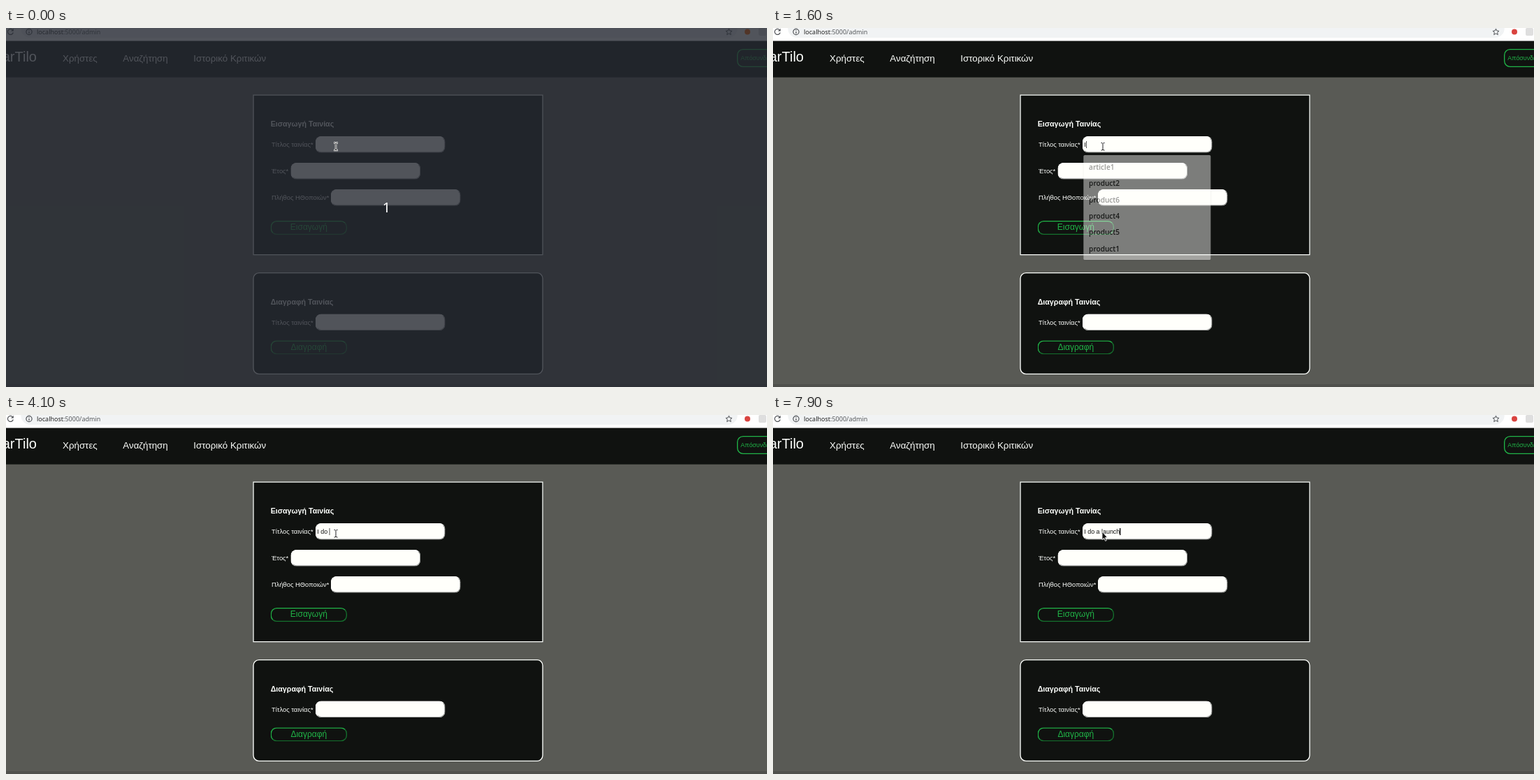
Animation, 1089 px wide and 514 px high, one loop 8000 ms. Source, as an HTML page:

```html
<!DOCTYPE html>
<html lang="el">
<head>
<meta charset="utf-8">
<title>Admin form</title>
<style>
html, body { margin: 0; width: 100%; height: 100%; overflow: hidden; }
#stage { position: relative; width: 1089px; height: 514px; overflow: hidden; background: #595a55; }
#page { position: absolute; width: 1634px; height: 771px; transform: scale(.66667); transform-origin: 0 0;
  font-family: "Liberation Sans", Arial, sans-serif; color: #fdfffc; }
#page *, #dim, #count, svg { position: absolute; box-sizing: border-box; white-space: pre; }
#bar { width: 1634px; height: 28px; background: #fff; }
#pill { left: 32px; top: -20px; width: 1538px; height: 41px; border-radius: 20px; background: #f1f3f4; }
#url { left: 66px; top: 8px; font: 13.5px/0 "Noto Sans", sans-serif; color: #55585b; }
#url b { position: static; font-weight: 400; color: #222; }
#head { top: 28px; width: 1634px; height: 78px; background: #101210; }
#foot { top: 765px; width: 1634px; height: 6px; background: #4f504c; }
.t { line-height: 0; }
.nav { top: 65px; font-size: 20px; }
#logo { right: 1568px; top: 61.5px; font-size: 30px; }
.panel { left: 530px; width: 623px; border: 2px solid #fdfffc; background: #101210; }
.title { left: 568px; font-size: 16px; font-weight: 700; }
.label { left: 570px; font-size: 14px; }
.field { width: 279px; height: 36px; border-radius: 13px; background: #fffffb;
  border: 2px solid; border-color: #fffffb #a3a5a3 #a3a5a3 #fffffb; }
.button { width: 164px; height: 30px; border-radius: 13px; border: 2px solid;
  border-color: #20b447 #14702d #14702d #20b447; color: #20b447; font-size: 18px; line-height: 25px; text-align: center; }
#logout { left: 1569px; top: 45px; width: 140px; height: 39px; padding-left: 6px;
  font-size: 13.33px; line-height: 35px; text-align: left; border-color: #20b447; }
#typed { left: 668px; top: 241.5px; font-size: 13.33px; line-height: 18px; color: #111; }
#typed * { position: static; }
#caret { display: inline-block; width: 1.5px; height: 15px; vertical-align: -3px; background: #000; }
#menu { left: 663px; top: 270px; width: 280px; height: 231px; border-radius: 3px; background: #fffffd;
  box-shadow: 0 1px 3px #0004; color: #222; font: 600 15.5px/0 "Open Sans", "Noto Sans", sans-serif; }
#menu * { left: 12px; }
#dim { inset: 0; background: rgba(38, 42, 50, .8); }
#count { left: 0; width: 1089px; top: 257px; text-align: center; font: 20px/0 "Noto Sans", sans-serif; color: #fff; }
svg { left: 0; top: 0; fill: none; }
.early #mark { fill: #f60; }
</style>
</head>
<body>
<div id="stage">
  <div id="page">
    <div id="bar"></div><div id="pill"></div>
    <div id="url"><b>localhost</b>:5000/admin</div>
    <div id="head"></div><div id="foot"></div>
    <div id="logo" class="t">arTilo</div>
    <div class="t nav" style="left:121.5px">Χρήστες</div>
    <div class="t nav" style="left:251px">Αναζήτηση</div>
    <div class="t nav" style="left:402.5px">Ιστορικό Κριτικών</div>
    <div id="logout" class="button">Απόσυνδεση</div>

    <div class="panel" style="top:142.5px;height:345px"></div>
    <div class="t title" style="top:206px">Εισαγωγή Ταινίας</div>
    <div class="t label" style="top:250px">Τίτλος ταινίας*</div>
    <div class="field" style="left:664px;top:232px"></div>
    <div class="t label" style="top:307px">Έτος*</div>
    <div class="field" style="left:611px;top:289px"></div>
    <div class="t label" style="top:364px">Πλήθος ΗΘοποιών*</div>
    <div class="field" style="left:697px;top:346px"></div>
    <div class="button" style="left:568px;top:414px">Εισαγωγή</div>

    <div class="panel" style="top:524.5px;height:219.5px;border-radius:13px"></div>
    <div class="t title" style="top:589px">Διαγραφή Ταινίας</div>
    <div class="t label" style="top:632px">Τίτλος ταινίας*</div>
    <div class="field" style="left:664px;top:614px"></div>
    <div class="button" style="left:568px;top:671px">Διαγραφή</div>

    <div id="typed"><span id="text"></span><span id="caret"></span></div>
    <div id="menu"></div>
  </div>

  <svg width="1089" height="514">
    <g stroke="#505357" stroke-width="1.2">
      <path d="M9.6 3A4 4 0 1 0 10.3 6.5"/>
      <path d="M10.8 .8V4.6H7z" fill="#505357" stroke="none"/>
      <circle cx="33" cy="5.5" r="4.1"/>
      <path d="M33 5V8M33 3V4.1"/>
      <path d="M1034.5 1l1.3 3 3.2.3-2.4 2.1.7 3.2-2.8-1.7-2.8 1.7.7-3.2-2.4-2.1 3.2-.3z" stroke-width="1"/>
    </g>
    <circle id="mark" cx="1061" cy="5.5" r="4" fill="#d9433f"/>
    <rect x="1077" y="0" width="11" height="11" rx="2" fill="#dedede"/>
  </svg>
  <div id="dim"></div>
  <div id="count">1</div>

  <svg width="1089" height="514">
    <g id="beam">
      <path d="M469 164.5H471L472 165.5 473 164.5H475M472 165.5V174M469 175H471L472 174 473 175H475" stroke="#fff" stroke-width="2.6"/>
      <path d="M469.5 164.5H471L472 165.5 473 164.5H474.5M472 165.5V174M469.5 175H471L472 174 473 175H474.5" stroke="#222"/>
    </g>
    <path id="arrow" d="M471 167V178.5L473.6 176.2 475.6 180.4 477.3 179.6 475.4 175.5H478.5z" fill="#111" stroke="#fff" stroke-width=".8"/>
  </svg>
</div>

<script>
const $ = id => document.getElementById(id);
const LOOP = 8000, TITLE = "I do a launch";

// [time, letters typed, caret on]
const STEPS = [
  [0, 0, 0], [500, 0, 1], [1100, 0, 0], [1500, 1, 1], [2500, 1, 0], [2700, 2, 1], [2900, 3, 1],
  [3200, 4, 1], [3800, 4, 0], [4100, 5, 1], [4700, 6, 1], [4900, 7, 1], [5500, 7, 0], [5800, 8, 1],
  [6000, 9, 1], [6200, 10, 1], [6500, 11, 1], [6600, 12, 1], [7200, 12, 0], [7300, 13, 1]
];

["article1", "product2", "product6", "product4", "product5", "product1"].forEach((name, i) => {
  const item = document.createElement("div");
  item.textContent = name;
  item.style.top = 26 + i * 36 + "px";
  $("menu").append(item);
});

const show = (id, on) => $(id).style.visibility = on ? "visible" : "hidden";

function draw(t) {
  const [, letters, caret] = STEPS.findLast(step => step[0] <= t);
  $("text").textContent = TITLE.slice(0, letters);
  show("caret", caret);

  const early = t < 500;
  $("stage").className = early ? "early" : "";
  show("dim", early);
  show("count", early);

  // the list fades and shrinks a little as it closes
  const fade = t < 1500 ? 1 : t < 1600 ? .83 : .45;
  show("menu", !early && t < 1700);
  $("menu").style.opacity = fade;
  $("menu").style.transform = `scale(${1 - (1 - fade) * .045})`;

  show("beam", t < 7900);
  show("arrow", t >= 7900);
}

const start = performance.now();
function tick() {
  draw((performance.now() - start) % LOOP);
  requestAnimationFrame(tick);
}
tick();
</script>
</body>
</html>
```
